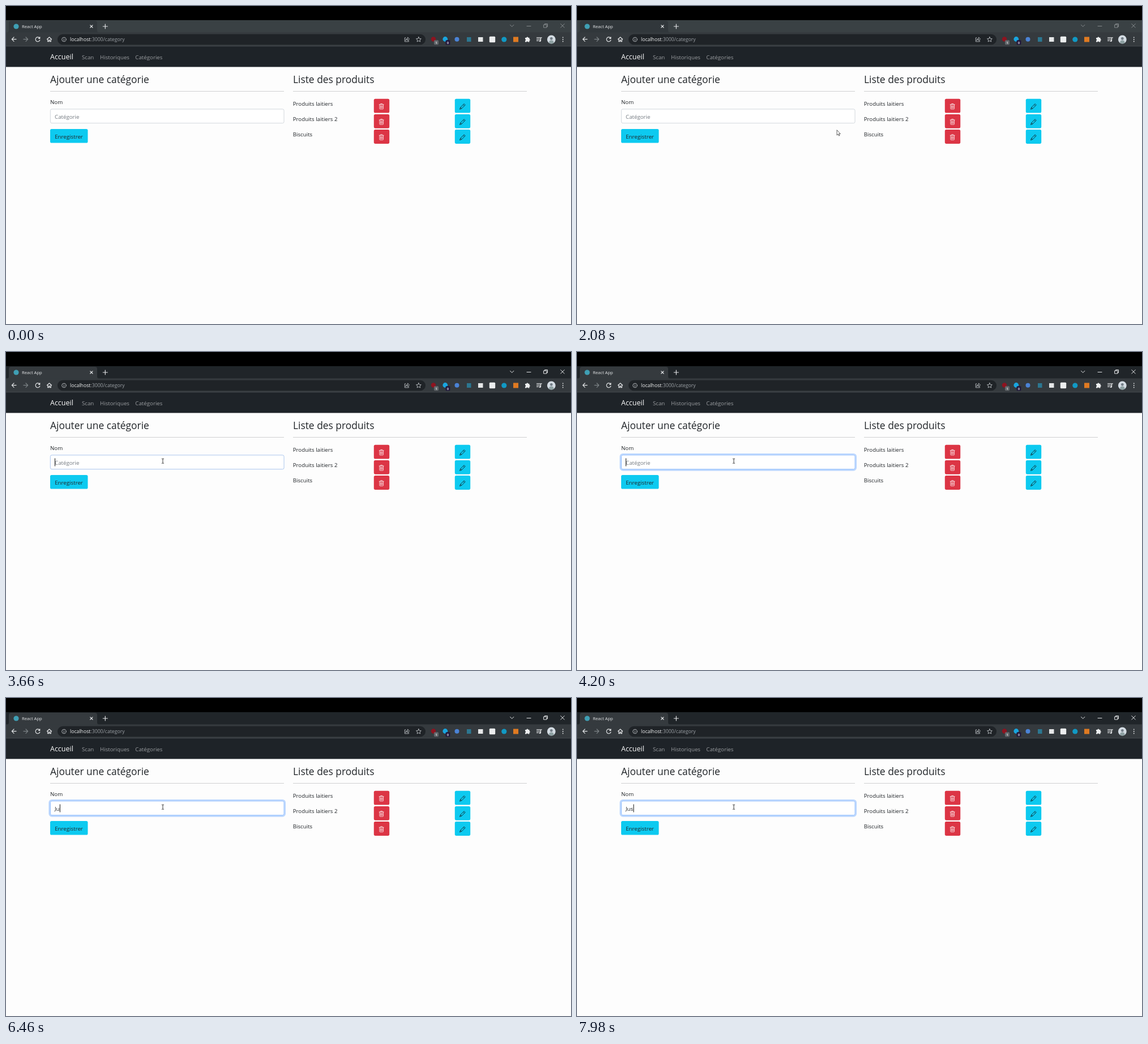
Write an HTML page that moves like this. It is 998 by 561 pixels and loops after 8000 ms.

```html
<!DOCTYPE html>
<html lang="fr">
<head>
<meta charset="utf-8">
<title>React App</title>
<style>
  html, body { margin: 0; width: 100%; height: 100%; overflow: hidden; background: #fdfdfd; }
  svg { display: block; width: 998px; height: 561px; }
  text { font: 9.72px "Open Sans", "Noto Sans", sans-serif; fill: #212529; }
  .title { font-size: 17.4px; font-weight: 500; }
  .nav { fill: #9a9da0; }
  .brand { font-size: 12.5px; fill: #fff; }
  .url { font-size: 8.7px; fill: #9da2a7; }
  .tab { font-size: 7.65px; fill: #e6e8ea; }
  .badge { font-size: 6px; font-weight: 600; fill: #fff; text-anchor: middle; }
  .line { fill: none; stroke: #e3e5e7; stroke-width: 1.2; stroke-linecap: round; stroke-linejoin: round; }
</style>
</head>
<body>
<svg viewBox="0 0 998 561">
  <defs>
    <g id="trash" fill="none" stroke="#fff" stroke-width=".75" stroke-linecap="round" stroke-linejoin="round">
      <path d="M-4-3.3H4M-1.5-3.5V-4.7H1.5V-3.5M-3.3-3.2V3.8Q-3.3 4.8-2.3 4.8H2.3Q3.3 4.8 3.3 3.8V-3.2M-1.6-1.3V3M0-1.3V3M1.6-1.3V3"/>
    </g>
    <g id="pencil" fill="none" stroke="#14272c" stroke-width=".85" stroke-linejoin="round">
      <path d="M-4.8 4.8L-3.5 1.4L2.8-4.9L4.9-2.8L-1.4 3.5ZM1.2-3.3L3.3-1.2M-3.5 1.4L-2.7 2.7L-1.4 3.5"/>
    </g>
  </defs>

  <rect width="998" height="561" fill="#fdfdfd"/>
  <rect width="998" height="25" fill="#000"/>

  <!-- browser window -->
  <rect id="strip" y="25" width="998" height="22"/>
  <path id="tab" d="M1 47Q5 47 5 43V30Q5 26 9 26H157Q161 26 161 30V43Q161 47 165 47Z"/>
  <rect y="46.5" width="998" height="24.5" fill="#353a3e"/>
  <circle cx="18" cy="36" r="4.6" fill="#3f9fb4"/>
  <text class="tab" x="28" y="38.5">React App</text>
  <path class="line" d="M148.8 33.8L153 38M153 33.8L148.8 38"/>
  <path class="line" d="M171.3 36H179.3M175.3 32V40"/>
  <g id="windowButtons" class="line" style="stroke-width:1">
    <path d="M890.5 33.3L893.7 36.5L896.9 33.3M920 35.5H927M979.7 31.5L986.3 38.1M986.3 31.5L979.7 38.1"/>
    <path d="M950 33H955V38H950ZM951.5 33V31.5H956.5V36.5H955"/>
  </g>

  <g class="line">
    <path d="M18 58.7H10.5M14 55L10.3 58.7L14 62.4"/>
    <path d="M31 58.7H38.5M35 55L38.7 58.7L35 62.4" stroke="#7d8387" style="stroke:#7d8387"/>
    <path d="M59.3 56.6A3.9 3.9 0 1 0 59.8 60M59.8 54.8V57.3H57.3"/>
    <path d="M72.4 58.7L76.5 55L80.6 58.7M73.7 58V62.6H75.6V60H77.4V62.6H79.3V58"/>
  </g>
  <rect x="91" y="49.7" width="650" height="18.6" rx="9.3" fill="#1f2327"/>
  <g class="line" style="stroke-width:.9;stroke:#bcc0c3">
    <circle cx="102.4" cy="59" r="3.7"/>
    <path d="M102.4 58.7V60.9M102.4 57V57.1"/>
    <path d="M706 56H704.3V62.8H711.3V61M706 60.5Q706.3 57.3 709.5 57.3V55.2L712.6 58.2L709.5 61V59Q707.3 59 706 60.5Z"/>
    <path d="M728.9 54.6L730.2 57.5L733.3 57.8L731 59.9L731.7 63L728.9 61.4L726.1 63L726.8 59.9L724.5 57.8L727.6 57.5Z"/>
  </g>
  <text class="url" x="113" y="62.2"><tspan fill="#f1f2f3">localhost</tspan>:3000/category</text>

  <!-- extensions -->
  <circle cx="755" cy="58.5" r="4.2" fill="#8d1420"/>
  <rect x="756" y="60.3" width="8" height="8" rx="1.5" fill="#62676b"/>
  <text class="badge" x="760" y="66.5">1</text>
  <circle cx="775.8" cy="58.5" r="4.4" fill="#18a5df"/>
  <rect x="776.5" y="60.3" width="8" height="8" rx="1.5" fill="#21183d"/>
  <text class="badge" x="780.5" y="66.5">0</text>
  <circle cx="796.5" cy="58.8" r="4" fill="#4b83d6"/>
  <rect x="814" y="55" width="7.5" height="8" fill="#2c7791"/>
  <rect x="834" y="55" width="8.5" height="8" fill="#e5e7e8"/>
  <rect x="853.8" y="53.8" width="10.4" height="10.4" rx="1.5" fill="#eceeef"/>
  <circle cx="879.8" cy="59" r="4.6" fill="#1199c4"/>
  <rect x="896" y="54.5" width="9" height="9" fill="#df7a22"/>
  <path fill="#eceeef" d="M917 56H919.3A1.6 1.6 0 0 1 922.5 56H924.5V58.2A1.6 1.6 0 0 1 924.5 61.3V63.5H922.2A1.5 1.5 0 0 0 919.3 63.5H917V61.2A1.6 1.6 0 0 0 917 58.2Z"/>
  <path class="line" d="M937.5 55.8H943.5M937.5 58.5H943.5M937.5 61.2H940.5M944.5 61.5V55.8H946.3"/>
  <circle cx="943.2" cy="61.6" r="1.5" fill="#e3e5e7"/>
  <circle cx="963.3" cy="59" r="7.4" fill="#d4dce3"/>
  <path d="M959 65Q959 60.5 963.3 60.5T967.6 65A7.4 7.4 0 0 1 959 65Z" fill="#8da0a2"/>
  <circle cx="963.3" cy="57.4" r="2.4" fill="#727d86"/>
  <path d="M983.7 55.3V55.4M983.7 58.9V59M983.7 62.5V62.6" class="line" style="stroke-width:1.8"/>

  <!-- page -->
  <rect y="71" width="998" height="36.5" fill="#1e2328"/>
  <rect y="70.5" width="998" height=".8" fill="#4a4f54"/>
  <text class="brand" x="78" y="94.3">Accueil</text>
  <text class="nav" x="134" y="93.5">Scan</text>
  <text class="nav" x="166" y="93.5">Historiques</text>
  <text class="nav" x="228.3" y="93.5">Catégories</text>
  <text class="title" x="78" y="136">Ajouter une catégorie</text>
  <text class="title" x="507" y="136">Liste des produits</text>
  <path d="M78 150.5H491M507 150.5H920" stroke="#cfd0d1"/>
  <text x="78" y="173.3">Nom</text>
  <rect id="ring" fill="none" stroke="#0d6efd" stroke-opacity=".27"/>
  <rect id="field" x="78.4" y="181.9" width="412.6" height="24.8" rx="2.6" fill="#fff" stroke-width=".9"/>
  <text id="value" x="86" y="198.5"></text>
  <rect id="caret" y="187.5" width="1" height="14" fill="#111"/>
  <rect x="78" y="217" width="66.5" height="24.5" rx="2.6" fill="#0dcaf0"/>
  <text x="86.2" y="233.7" fill="#000">Enregistrer</text>
  <g id="list"></g>

  <path id="arrow" d="M0 0V9.2L2.1 7.3L3.5 10.3L4.9 9.7L3.5 6.8H6.2Z" fill="#fff" stroke="#222" stroke-width=".7"/>
  <path id="ibeam" d="M-2-4H-.5L0-3.5L.5-4H2M0-3.5V3.5M-2 4H-.5L0 3.5L.5 4H2" fill="none" stroke="#222" stroke-width=".9"/>
</svg>
<script>
const LOOP = 8000, FOCUS = 3600, FADE = 400, BLINK = 1420;
const typed = [[6020, "J"], [6400, "Ju"], [6800, "Jus"]];
// time, x, y of the pointer
const pointerPath = [
  [860, 742, 346], [1250, 727, 238], [1330, 726, 238], [1660, 640, 229],
  [2400, 322, 211], [2780, 291.5, 205.5], [3200, 277, 192.3]
];
const $ = id => document.getElementById(id);
const set = (id, attrs) => {
  for (const name in attrs) $(id).setAttribute(name, attrs[name]);
};
const show = (id, on) => set(id, { visibility: on ? "visible" : "hidden" });
const clamp = v => Math.max(0, Math.min(1, v));
const lerp = (a, b, p) => a + (b - a) * p;

$("list").innerHTML = ["Produits laitiers", "Produits laitiers 2", "Biscuits"].map((name, i) => `
  <g transform="translate(0 ${163.7 + i * 27.2})">
    <text x="506.7" y="12">${name}</text>
    <rect x="649.8" width="27.4" height="24.8" rx="2.6" fill="#dc3545"/>
    <use href="#trash" x="663.2" y="13.4"/>
    <rect x="792.8" width="27.4" height="24.8" rx="2.6" fill="#0dcaf0"/>
    <use href="#pencil" x="806.3" y="13.7"/>
  </g>`).join("");

function pointerAt(t) {
  const next = pointerPath.findIndex(k => k[0] > t);
  if (next < 0) return pointerPath.at(-1).slice(1);
  if (next === 0) return pointerPath[0].slice(1);
  const [t0, x0, y0] = pointerPath[next - 1], [t1, x1, y1] = pointerPath[next];
  const p = (t - t0) / (t1 - t0);
  return [lerp(x0, x1, p), lerp(y0, y1, p)];
}

function draw(t) {
  const active = t >= FOCUS;
  set("strip", { fill: active ? "#202529" : "#3a4144" });
  set("tab", { fill: active ? "#353a3e" : "#31373b" });
  set("windowButtons", { opacity: active ? 1 : .45 });

  const glow = clamp((t - FOCUS) / FADE) ** 1.4, spread = 2.6 * glow;
  const border = clamp((t - FOCUS) / 120);
  const mix = [[206, 134], [212, 183], [218, 254]].map(([a, b]) => Math.round(lerp(a, b, border)));
  set("field", { stroke: `rgb(${mix})` });
  set("ring", {
    x: 78 - spread / 2, y: 181.5 - spread / 2, rx: 3 + spread / 2,
    width: 413.4 + spread, height: 25.6 + spread, "stroke-width": spread
  });

  const key = typed.filter(k => t >= k[0]).at(-1);
  $("value").textContent = key ? key[1] : "Catégorie";
  $("value").style.fill = key ? "#212529" : "#737a81";
  const caretStart = key ? key[0] : FOCUS;
  show("caret", active && Math.floor((t - caretStart) / BLINK) % 2 === 0);
  set("caret", { x: 86 + (key ? $("value").getComputedTextLength() + .3 : 0) });

  const [x, y] = pointerAt(t), overField = t > 2860;
  show("arrow", t >= pointerPath[0][0] && !overField);
  show("ibeam", overField);
  set(overField ? "ibeam" : "arrow", { transform: `translate(${x} ${y})` });
}

const start = performance.now();
function tick() {
  draw((performance.now() - start) % LOOP);
  requestAnimationFrame(tick);
}
tick();
</script>
</body>
</html>
```
